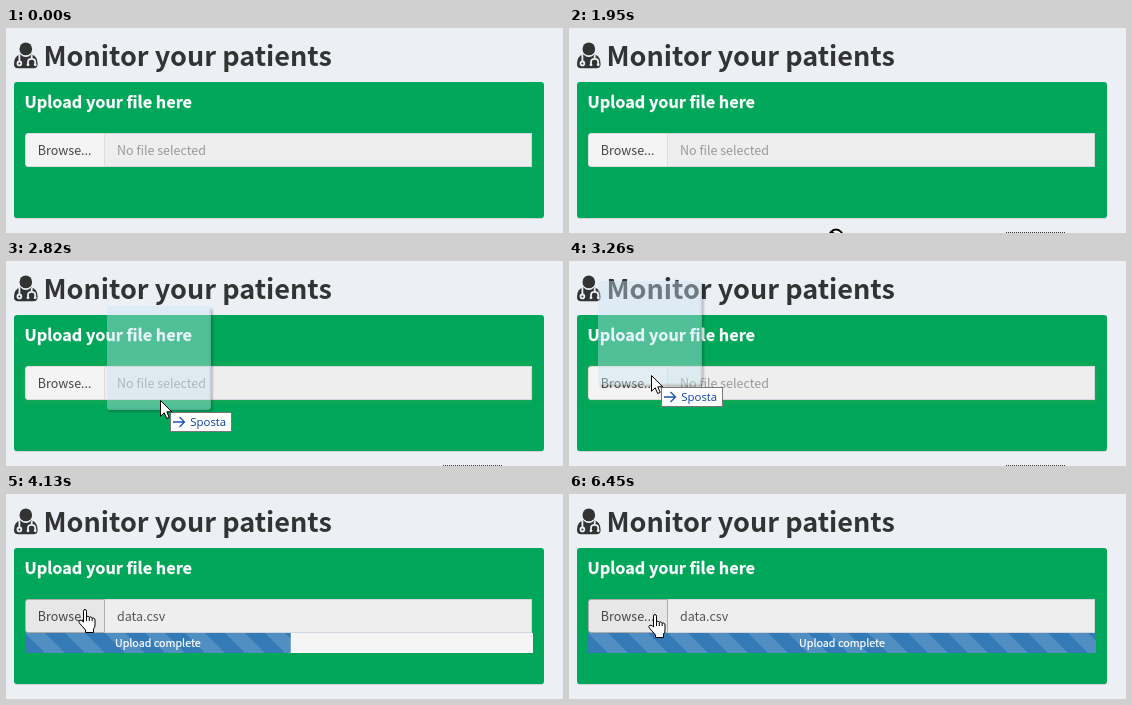
Animation of 557 by 205 pixels, one loop 8.95 s. Source, as an HTML page:

```html
<!DOCTYPE html>
<html lang="en">
<head>
<meta charset="utf-8">
<title>Monitor your patients</title>
<style>
  html, body { margin: 0; width: 100%; height: 100%; overflow: hidden; background: #ecf0f5; }
  svg { display: block; width: 557px; height: 205px; }
  text { font-family: "Noto Sans CJK JP", "Noto Sans CJK SC", "Noto Sans CJK", "Source Sans Pro", sans-serif; font-size: 12.53px; }
  .heading { font-size: 27.05px; font-weight: 700; fill: #333; }
  .title { font-size: 16.28px; font-weight: 700; fill: #fff; stroke: #fff; stroke-width: .25px; }
  .status { font-size: 10.74px; fill: #fff; stroke: #fff; stroke-width: .2px; text-anchor: middle; }
  .tip { font-family: "Open Sans", "Noto Sans", sans-serif; font-size: 11.4px; fill: #0a3fb0; }
</style>
</head>
<body>
<svg viewBox="0 0 557 205" xmlns="http://www.w3.org/2000/svg">
  <defs>
    <pattern id="stripes" x="19" y="139" width="40" height="20" patternUnits="userSpaceOnUse">
      <rect width="40" height="20" fill="#337ab7"/>
      <path d="M0 0H20L40 20H20Z" fill="#fff" fill-opacity=".15"/>
    </pattern>
    <clipPath id="barClip"><rect id="barMask" x="19" y="139" width="0" height="20"/></clipPath>
    <filter id="blur" x="-5%" y="-60%" width="110%" height="220%"><feGaussianBlur stdDeviation="3.5"/></filter>
    <filter id="soft" x="-10%" y="-10%" width="120%" height="120%"><feGaussianBlur stdDeviation="1"/></filter>
    <filter id="edge"><feGaussianBlur stdDeviation=".5"/></filter>
    <linearGradient id="sheen" x1="0" y1="0" x2="0" y2="1">
      <stop offset="0" stop-color="#cae4f4" stop-opacity=".4"/>
      <stop offset="1" stop-color="#c4e4ef" stop-opacity=".41"/>
    </linearGradient>
  </defs>

  <rect width="557" height="205" fill="#ecf0f5"/>

  <!-- doctor icon -->
  <g fill="#333">
    <path d="M14.5 26.5Q17 29 19.8 29T25.2 26.5Q31.6 27.5 31.6 36Q31.6 40.3 27.5 40.3H12.2Q8 40.3 8 36Q8 27.5 14.5 26.5Z"/>
    <ellipse cx="19.8" cy="21" rx="6.3" ry="6.6"/>
    <g fill="none" stroke="#ecf0f5" stroke-width="1.8">
      <path d="M13.4 27V33.5M25.7 27V30.5M22 37V34Q22 30.8 25.6 30.8T29.2 34V37"/>
      <circle cx="13.4" cy="35.4" r="1.9"/>
      <path d="M15.5 26.3Q17.3 28 19.8 28T24.1 26.3" stroke-width="1"/>
    </g>
    <g fill="#ecf0f5"><circle cx="22" cy="36.8" r="1.4"/><circle cx="29.2" cy="36.8" r="1.4"/></g>
  </g>
  <text class="heading" x="37.5" y="38">Monitor your patients</text>

  <rect x="8" y="55" width="530" height="136" rx="3" fill-opacity=".12" filter="url(#edge)"/>
  <rect x="8" y="54" width="530" height="136" rx="3" fill="#00a65a"/>
  <text class="title" x="18.5" y="80">Upload your file here</text>

  <rect id="glow" x="19" y="105" width="507" height="34" filter="url(#blur)"/>
  <rect x="98.5" y="105.5" width="427" height="33" fill="#eee" stroke="#d2d6de"/>
  <path id="button" d="M98.5 105.5V138.5H22Q19.5 138.5 19.5 136V108Q19.5 105.5 22 105.5Z"/>
  <text x="31.8" y="127" fill="#444">Browse...</text>
  <text id="file" x="111" y="127"></text>

  <g id="progress">
    <rect x="19" y="139" width="508" height="20" fill="#f5f5f5"/>
    <g clip-path="url(#barClip)">
      <rect x="19" y="139" width="508" height="20" fill="url(#stripes)"/>
      <text id="status" class="status" y="153">Upload complete</text>
    </g>
  </g>

  <path id="marquee" d="M437 204.5H496" stroke="#333" stroke-dasharray="1 1"/>

  <g id="denied" fill="none">
    <circle r="6.5" stroke="#fff" stroke-width="4"/>
    <path d="M-4.5 -4.5L4.5 4.5" stroke="#000" stroke-width="2"/>
    <circle r="6.5" stroke="#000" stroke-width="2"/>
  </g>

  <g id="drag">
    <g id="ghost">
      <path d="M-51 10.5H49Q51.5 10.5 51.5 8V-91" fill="none" stroke="#000" stroke-opacity=".4" stroke-width="1.5" filter="url(#soft)"/>
      <rect x="-53" y="-94" width="104" height="104" rx="3" fill="url(#sheen)"/>
    </g>
    <rect x="10.5" y="12.5" width="61" height="19" fill="#fff" stroke="#777"/>
    <path d="M13 22H24.5M19.5 17L24.5 22L19.5 27" fill="none" stroke="#1d54b0" stroke-width="1.3"/>
    <text class="tip" x="30.3" y="26">Sposta</text>
    <path d="M.5 .5V16.3L4.2 12.8L6.7 18.5L9.2 17.4L6.8 11.8H11.7Z" fill="#fff" stroke="#000"/>
  </g>

  <g id="hand" stroke="#000" stroke-linejoin="round">
    <path fill="#fff" d="M5.5 13V2.2Q5.5 .5 7 .5T8.5 2.2V8Q9 7 10 7.2T11.3 8.4Q12 7.6 13 8T14.2 9.3Q15 8.7 16 9.2T17 11V16Q17 18.5 15.5 20V23.5H7.5V21Q5 18 1.5 14.2Q.3 12.5 1.4 11.5Q3 10.7 4.3 12Z"/>
    <path fill="none" d="M8.5 8V12M11.3 8.4V12M14.2 9.3V12"/>
  </g>
</svg>

<script>
const LOOP = 8950, ENTER = 2000, OVER = 2820, DROP = 3830, FILL = 3948;
const $ = id => document.getElementById(id);

// [time, x, y]
const deniedPath = [[1660, 430, 214], [1950, 267, 208.5], [2000, 255, 204]];
const dragPath = [[2000, 255, 200], [2310, 179, 153], [2500, 166, 143], [2750, 166, 143],
  [3260, 82, 114], [3450, 77, 116], [3630, 77, 115]];
const handPath = [[3830, 72, 115], [4200, 72, 115], [4720, 80, 120], [5030, 81, 120],
  [5400, 80, 120], [5649, 80, 120], [5650, 79, 120], [6149, 79, 120],
  [6150, 78, 119], [6449, 78, 119], [6450, 79, 120]];

const clamp = v => Math.min(1, Math.max(0, v));
const ramp = (t, start, length) => clamp((t - start) / length);

function along(path, t) {
  let i = 0;
  while (i < path.length - 2 && t >= path[i + 1][0]) i++;
  const [t0, x0, y0] = path[i], [t1, x1, y1] = path[i + 1];
  const k = ramp(t, t0, t1 - t0);
  return [x0 + (x1 - x0) * k, y0 + (y1 - y0) * k];
}

// cubic-bezier(.25, .1, .25, 1)
function ease(p) {
  const bezier = (a, b, u) => 3 * a * u * (1 - u) ** 2 + 3 * b * u * u * (1 - u) + u ** 3;
  let lo = 0, hi = 1;
  for (let i = 0; i < 24; i++) {
    const mid = (lo + hi) / 2;
    if (bezier(.25, .25, mid) < p) lo = mid; else hi = mid;
  }
  return bezier(.1, 1, hi);
}

function show(id, on) {
  $(id).style.display = on ? "" : "none";
}

// Cursors sit on whole pixels.
function place(id, path, t) {
  const [x, y] = along(path, t).map(Math.round);
  $(id).setAttribute("transform", `translate(${x} ${y})`);
}

function draw(t) {
  const dragging = t >= ENTER && t < DROP, dropped = t >= DROP;

  show("marquee", t >= 1150 && !dropped);
  show("denied", t >= 1660 && t < ENTER);
  show("drag", dragging);
  show("hand", dropped);
  show("progress", dropped);
  place("denied", deniedPath, t);
  place("drag", dragPath, t);
  place("hand", handPath, t);
  $("ghost").setAttribute("opacity", ramp(t, ENTER, 200));

  show("glow", dragging);
  $("glow").setAttribute("fill", t < OVER ? "#66afe9" : "#4cae4c");
  $("glow").setAttribute("opacity", .6 * ramp(t, ENTER, 150));

  $("button").setAttribute("fill", dropped ? "#e7e7e7" : "#f4f4f4");
  $("button").setAttribute("stroke", dropped ? "#adadad" : "#ddd");
  $("file").textContent = dropped ? "data.csv" : "No file selected";
  $("file").setAttribute("fill", dropped ? "#555" : "#999");

  const width = 508 * ease(ramp(t, FILL, 600));
  $("barMask").setAttribute("width", width);
  $("status").setAttribute("x", 19 + width / 2);
}

const start = performance.now();
function tick() {
  draw((performance.now() - start) % LOOP);
  requestAnimationFrame(tick);
}
tick();
</script>
</body>
</html>
```
